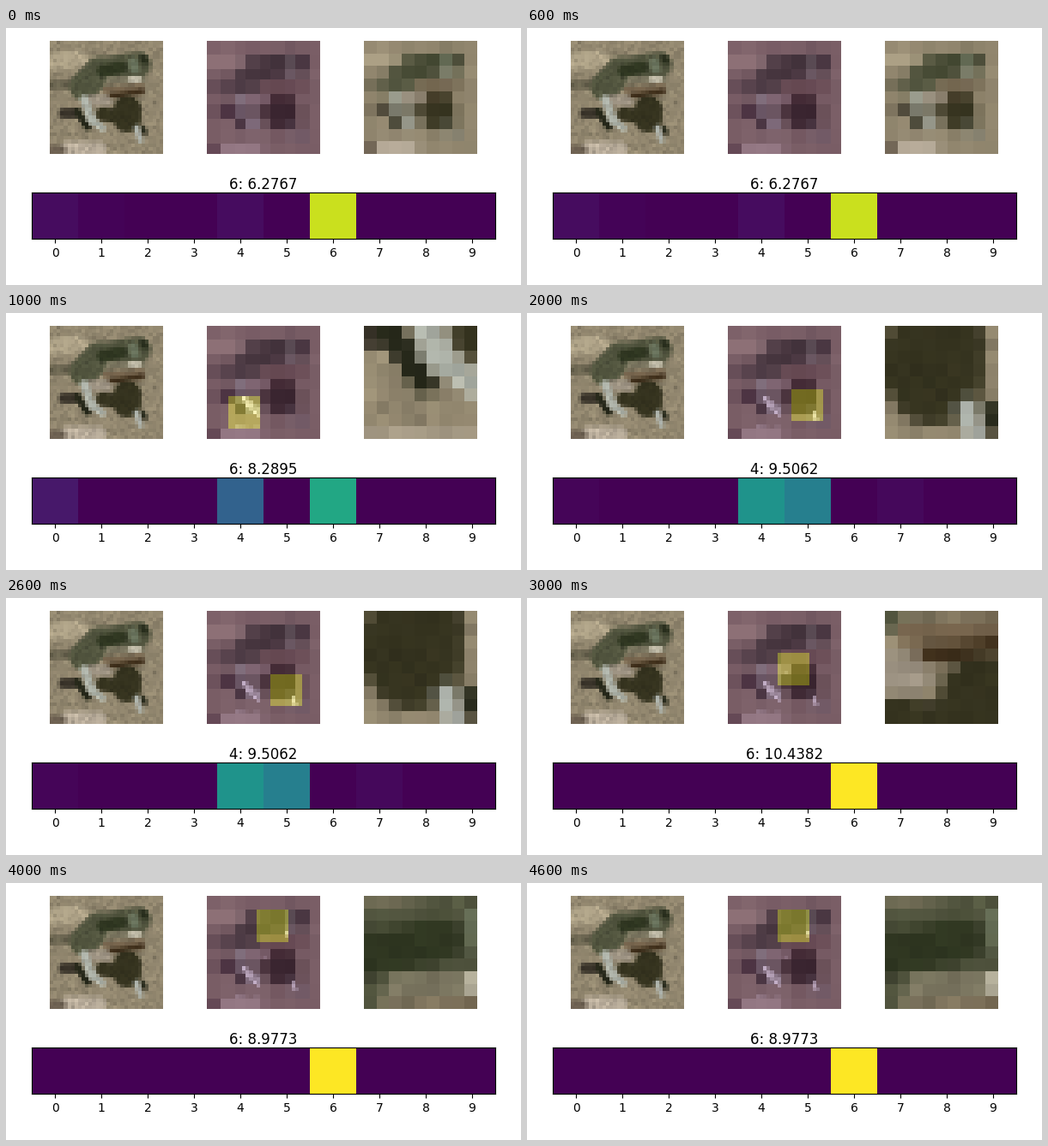
Animation, 600 px wide and 300 px high, one loop 5 s. Source, as a matplotlib script:

```python
import numpy as np
import matplotlib.pyplot as plt
from matplotlib.animation import FuncAnimation
from matplotlib.colors import to_rgb

plt.rcParams["font.family"] = "DejaVu Sans"

N, G = 32, 9  # picture and glimpse size in cells

# Rounded brush strokes, back to front: colour, start, end, radius.
STROKES = [
    ("#aea287", (1, 6), (8, 5), 2.5),            # ground
    ("#645f4b", (0, 12.5), (6, 12.5), 1.2),
    ("#b8ac9a", (5, 30.5), (14, 30.5), 2),
    ("#6b5f50", (0, 31), (3, 31), 1.5),
    ("#52553f", (9.5, 13), (14, 8.5), 4),        # back and head
    ("#52553f", (14, 8.5), (25, 6.8), 3.6),
    ("#2f3621", (15, 8.5), (20, 7.5), 1.8),
    ("#66705a", (23.5, 6), (24, 8), 1.3),
    ("#2a2f1e", (26.5, 5), (27, 5.5), 1.2),
    ("#7d7862", (17, 11.5), (26, 11.3), 1.4),
    ("#c0bba8", (23, 11), (25, 11), 1),
    ("#75634c", (16, 13.8), (26, 13.2), 1),      # mouth
    ("#3f2f1b", (17, 15.6), (26, 14.4), .8),
    ("#9c9282", (12, 16.8), (16, 17), 1.6),      # chest and belly
    ("#35331f", (22, 19.5), (22, 22), 3.9),
    ("#35331f", (15, 20.8), (20, 21.5), 1.9),
    ("#3a342a", (4, 20.5), (7, 20.5), 1.4),      # legs
    ("#26281a", (7.8, 20), (10.8, 24.5), 1),
    ("#adb2a8", (9.8, 16.5), (11.8, 22.3), 1.2),
    ("#adb2a8", (11.8, 22.3), (14.8, 24.7), 1),
    ("#2e3020", (26.2, 24.5), (27, 26), .7),
    ("#adb2ab", (24.5, 24.6), (25.6, 28), .8),
]

# Glimpse corner, title, class scores.
STEPS = [
    (None, "6: 6.2767", {0: .035, 1: .01, 4: .035, 6: .92}),
    ((6, 20), "6: 8.2895", {0: .065, 4: .315, 6: .6}),
    ((18, 18), "4: 9.5062", {0: .015, 4: .515, 5: .43, 7: .02}),
    ((14, 12), "6: 10.4382", {6: 1}),
    ((14, 4), "6: 8.9773", {6: 1}),
]


def paint():
    """Paint the frog cell by cell with soft-edged strokes."""
    c = np.arange(N) + .5
    pos = np.stack(np.meshgrid(c, c), -1)
    img = np.tile(to_rgb("#92876f"), (N, N, 1))
    for color, a, b, r in STROKES:
        a, b = np.array(a), np.array(b)
        t = np.clip((pos - a) @ (b - a) / ((b - a) @ (b - a)), 0, 1)
        dist = np.linalg.norm(pos - a - t[..., None] * (b - a), axis=-1)
        cover = np.clip(r + .5 - dist, 0, 1)[..., None]
        img += cover * (np.array(to_rgb(color)) - img)
    grain = np.random.default_rng(6).normal(0, .05, (N, N, 1))
    return np.clip(img * (1 + grain), 0, 1)


def shrink(img):
    """Average the picture into G x G blocks."""
    cuts = np.ceil(np.arange(G) * N / G).astype(int)
    size = np.diff(np.append(cuts, N))
    total = np.add.reduceat(np.add.reduceat(img, cuts, 0), cuts, 1)
    return total / (size[:, None] * size)[..., None]


frog = paint()
gist = shrink(frog)
near = np.arange(N) * G // N
blurred = gist[near][:, near]
glow = np.clip(6 * (frog.mean(-1, keepdims=True) - .57), 0, .95)
viridis = plt.get_cmap("viridis")


def window(step):
    x, y = STEPS[step][0]
    return slice(y, y + G), slice(x, x + G)


def memory(step):
    """Blurred picture, lit up where seen so far, under the attention mask."""
    img, mask = blurred.copy(), np.zeros((N, N))
    for k in range(1, step + 1):
        w = window(k)
        img[w] = blurred[w] + glow[w] * (1 - blurred[w])
    if step:
        mask[window(step)] = 1
    return .7 * img + .3 * viridis(mask)[..., :3]


def glimpse(step):
    return frog[window(step)] if step else gist


fig = plt.figure(figsize=(6, 3), dpi=100, facecolor="white")
grid = fig.add_gridspec(2, 3, left=.05, right=.95, bottom=.05, top=.95,
                        wspace=.05, hspace=.05)


def add_picture(col, img):
    ax = fig.add_subplot(grid[0, col])
    ax.axis("off")
    return ax.imshow(img, interpolation="nearest")


add_picture(0, frog)
seen = add_picture(1, memory(0))
patch = add_picture(2, glimpse(0))

bar_ax = fig.add_subplot(grid[1, :])
bar = bar_ax.imshow(np.zeros((1, 10)), cmap="viridis", vmin=0, vmax=1,
                    interpolation="nearest")
bar_ax.set_xticks(range(10))
bar_ax.set_yticks([])
title = bar_ax.set_title("", fontsize=12, pad=1.6)


def draw(step):
    _, label, scores = STEPS[step]
    seen.set_data(memory(step))
    patch.set_data(glimpse(step))
    bar.set_data([[scores.get(i, 0) for i in range(10)]])
    title.set_text(label)
    return seen, patch, bar, title


anim = FuncAnimation(fig, draw, frames=len(STEPS), interval=1000,
                     repeat=True, repeat_delay=0, blit=False)
plt.show()
```
